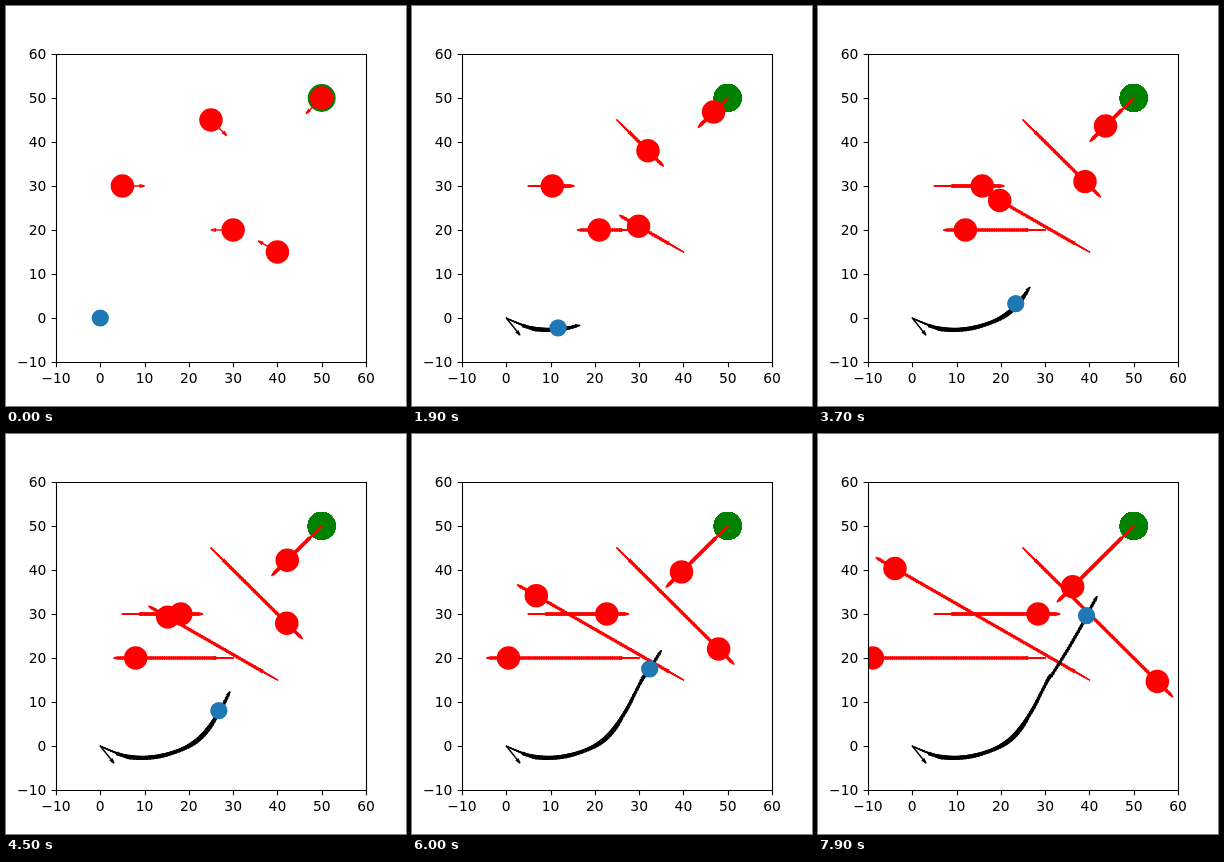
An HTML page with a canvas that plays this animation: 400 px wide and 400 px high, repeating every 8000 ms.

```html
<!DOCTYPE html>
<html lang="en">
<head>
<meta charset="utf-8">
<title>Moving obstacles</title>
<style>
  html, body { margin: 0; width: 100%; height: 100%; overflow: hidden; background: #fff; }
  canvas, svg { position: absolute; left: 0; top: 0; width: 400px; height: 400px; }
  text { font: 13.89px "DejaVu Sans", sans-serif; fill: #000; }
  path { fill: none; stroke: #000; stroke-width: 1.11; }
</style>
</head>
<body>
<canvas id="plot" width="400" height="400"></canvas>
<svg id="axes" viewBox="0 0 400 400"></svg>
<script>
const STEP = 100, STEPS = 80;
const LEFT = 50, TOP = 48, RIGHT = 360, BOTTOM = 356;
const SX = (RIGHT - LEFT) / 70, SY = (BOTTOM - TOP) / 70;
const EDGE = 1.389;
const px = x => LEFT + (x + 10) * SX;
const py = y => BOTTOM - (y + 10) * SY;
const rad = deg => deg * Math.PI / 180;

const ctx = document.getElementById('plot').getContext('2d');

// x, y, direction in degrees, speed per step
const obstacles = [
  [5, 30, 0, 0.3],
  [30, 20, 180, 0.5],
  [25, 45, -45, 0.55],
  [50, 50, 225, 0.25],
  [40, 15, 150, 0.65]
].map(([x, y, dir, speed]) => ({ x, y, dir, speed }));

// Robot heading: step, degrees
const headings = [
  [1, -51.5], [2, -24], [6, -22], [9, -15], [19, 6.6], [27, 20.5], [37, 49.2],
  [45, 59.7], [51, 62.5], [52, 58], [60, 58], [71, 60], [73, 62], [79, 61.5]
];

function heading(n) {
  if (n <= 1) return headings[0][1];
  const i = headings.findIndex(h => h[0] >= n);
  const [n0, a0] = headings[i - 1], [n1, a1] = headings[i];
  return a0 + (a1 - a0) * (n - n0) / (n1 - n0);
}

// The robot speeds up, then keeps a constant pace along its heading
const robot = [{ x: 0, y: 0 }];
for (let n = 0; n < STEPS - 1; n++) {
  const { x, y } = robot[n];
  const speed = Math.min(0.735, 0.18 * n);
  const a = rad(heading(n + 0.5));
  robot.push({ x: x + speed * Math.cos(a), y: y + speed * Math.sin(a) });
}

function obstacleAt(o, n) {
  const d = o.speed * Math.max(0, n - 1), a = rad(o.dir);
  return { x: o.x + d * Math.cos(a), y: o.y + d * Math.sin(a) };
}

function paint(color) {
  ctx.fillStyle = ctx.strokeStyle = color;
  ctx.fill();
  ctx.stroke();
}

function circle({ x, y }, r, color) {
  ctx.beginPath();
  ctx.ellipse(px(x), py(y), r * SX, r * SY, 0, 0, 2 * Math.PI);
  paint(color);
}

const arrowShape = [
  [0, 0.0005], [4, 0.0005], [4, 0.25], [5, 0], [4, -0.25], [4, -0.0005], [0, -0.0005]
];

function arrow({ x, y }, dir, color) {
  const c = Math.cos(rad(dir)), s = Math.sin(rad(dir));
  ctx.beginPath();
  for (const [u, v] of arrowShape) ctx.lineTo(px(x + u * c - v * s), py(y + u * s + v * c));
  ctx.closePath();
  paint(color);
}

function draw(n) {
  ctx.clearRect(0, 0, 400, 400);
  ctx.save();
  ctx.beginPath();
  ctx.rect(LEFT, TOP, RIGHT - LEFT, BOTTOM - TOP);
  ctx.clip();
  ctx.lineWidth = EDGE;
  ctx.miterLimit = 3.9;
  // Repeated layers firm up the edges as the trails build
  for (let i = 0; i <= n; i++) circle({ x: 50, y: 50 }, 3, 'green');
  for (let i = 0; i <= n; i++) {
    for (const o of obstacles) arrow(obstacleAt(o, i), o.dir, 'red');
    if (i) arrow(robot[i], heading(i), 'black');
  }
  for (const o of obstacles) circle(obstacleAt(o, n), 2.5, 'red');
  circle(robot[n], 1.8, '#1f77b4');
  ctx.restore();
}

function drawAxes() {
  const snap = v => Math.floor(v + 0.5) + 0.5;
  let d = `M${LEFT + 0.5} ${TOP + 0.5}H${RIGHT + 0.5}V${BOTTOM + 0.5}H${LEFT + 0.5}Z`;
  let labels = '';
  for (let v = -10; v <= 60; v += 10) {
    const text = String(v).replace('-', '\u2212');
    d += `M${snap(px(v))} ${BOTTOM + 0.5}v4.86M${LEFT + 0.5} ${snap(py(v))}h-4.86`;
    labels += `<text x="${px(v)}" y="377" text-anchor="middle">${text}</text>`;
    labels += `<text x="40.3" y="${py(v) + 5}" text-anchor="end">${text}</text>`;
  }
  document.getElementById('axes').innerHTML = `<path d="${d}"/>${labels}`;
}

let shown = -1;
const start = performance.now();
function tick() {
  const n = Math.floor((performance.now() - start) / STEP) % STEPS;
  if (n !== shown) draw(shown = n);
  requestAnimationFrame(tick);
}
drawAxes();
tick();
</script>
</body>
</html>
```
